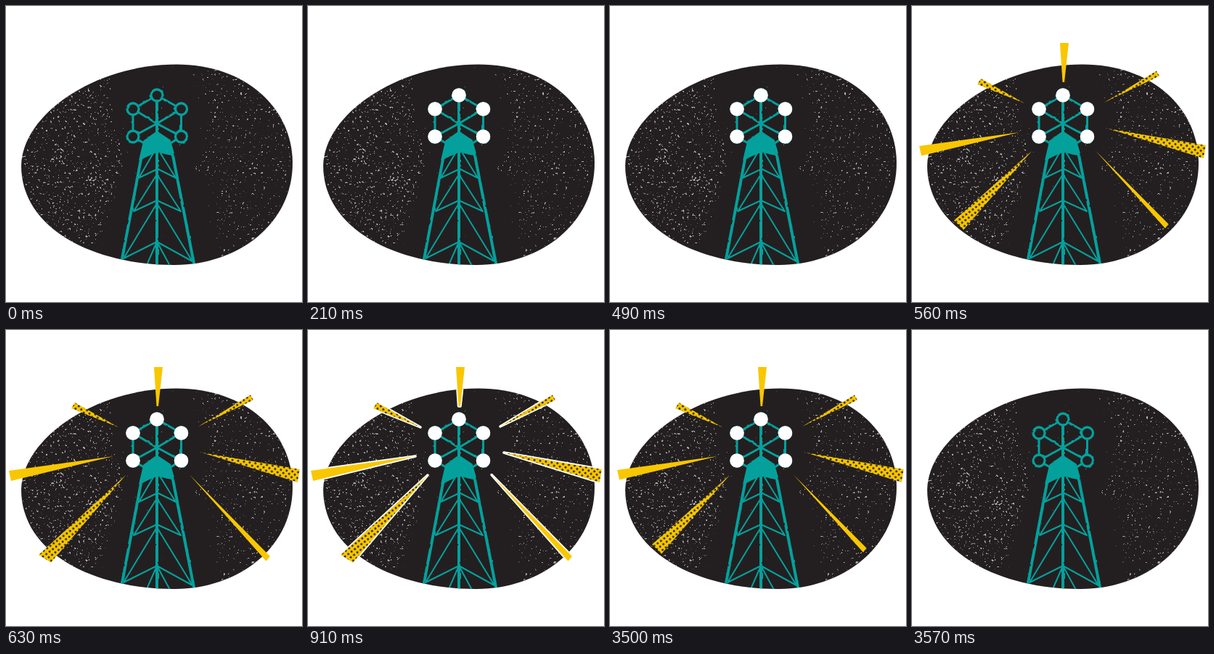
An HTML page without scripts that plays this animation: 408 by 408 pixels, repeating every 3.99 s.

```html
<!DOCTYPE html>
<html lang="en">
<head>
<meta charset="utf-8">
<title>Signal tower</title>
<style>
  html, body { margin: 0; width: 100%; height: 100%; overflow: hidden; background: #fff; }
  svg { display: block; width: 100vw; height: 100vh; }
  .dark { fill: #231f20; }
  .teal { fill: none; stroke: #04a19c; stroke-linecap: round; stroke-linejoin: round; }
  .plain { fill: #f8c700; }
  .dotted { fill: url(#dots); }
  .glow, .rays, .near, .far, .edge { visibility: hidden; animation: 3990ms step-end infinite; }
  .glow { animation-name: glow; }
  .rays { animation-name: rays; }
  .near { animation-name: near; }
  .far { animation-name: far; }
  .edge { animation-name: edge; }

  /* lamps flicker once, then stay lit */
  @keyframes glow {
    0%, 7.0175%, 89.4737% { visibility: hidden; }
    5.2632%, 8.7719% { visibility: visible; }
  }
  @keyframes rays {
    0%, 89.4737% { visibility: hidden; }
    14.0351% { visibility: visible; }
  }
  @keyframes near {
    0%, 15.7895%, 89.4737% { visibility: hidden; }
    14.0351%, 87.7193% { visibility: visible; }
  }
  @keyframes far {
    0%, 87.7193% { visibility: hidden; }
    15.7895% { visibility: visible; }
  }
  @keyframes edge {
    0%, 85.9649% { visibility: hidden; }
    22.807% { visibility: visible; }
  }
</style>
</head>
<body>
<svg viewBox="0 0 408 408" xmlns="http://www.w3.org/2000/svg">
  <defs>
    <path id="egg" d="M21 220C22 150 122 80.500 235 80.500C330 80.500 394 140 395 215C396 300 320 357 232 357C122 357 21 308 21 220Z"/>
    <clipPath id="inEgg"><use href="#egg"/></clipPath>

    <pattern id="dots" width="8" height="8" patternUnits="userSpaceOnUse" patternTransform="rotate(8)">
      <rect width="8" height="8" fill="#f8c700"/>
      <g class="dark"><circle cx="2" cy="2" r="1.5"/><circle cx="6" cy="6" r="1.5"/></g>
    </pattern>

    <filter id="rough" filterUnits="userSpaceOnUse" x="0" y="0" width="408" height="408" color-interpolation-filters="sRGB">
      <feTurbulence type="fractalNoise" baseFrequency=".14" seed="4"/>
      <feDisplacementMap in="SourceGraphic" scale="2.5" xChannelSelector="R" yChannelSelector="G"/>
    </filter>

    <!-- the drawn alpha sets how dense the grain is; slow noise gathers it into clumps -->
    <filter id="grain" filterUnits="userSpaceOnUse" x="0" y="0" width="408" height="408" color-interpolation-filters="sRGB">
      <feGaussianBlur in="SourceGraphic" stdDeviation="5" result="zone"/>
      <feTurbulence type="fractalNoise" baseFrequency=".06" numOctaves="2" seed="3" result="clumps"/>
      <feComposite in="zone" in2="clumps" operator="arithmetic" k1="1.4" k2=".3" result="density"/>
      <feTurbulence type="fractalNoise" baseFrequency=".31" numOctaves="3" seed="11"/>
      <feComposite in2="density" operator="arithmetic" k2="1" k3=".3" k4="-.835"/>
      <feComponentTransfer result="specks"><feFuncA type="linear" slope="11"/></feComponentTransfer>
      <feFlood flood-color="#b4b2b2"/>
      <feComposite in2="specks" operator="in"/>
    </filter>

    <g id="lamps">
      <circle cx="208" cy="123" r="8"/>
      <circle cx="175" cy="142" r="8"/>
      <circle cx="241.500" cy="142" r="8"/>
      <circle cx="175" cy="180" r="8"/>
      <circle cx="241.500" cy="180" r="8"/>
    </g>

    <g id="fixed">
      <path class="plain" d="M204 51L216 51L210 105L207.500 105Z"/>
      <path class="dotted" d="M95 100L90 108L155 134Z"/>
      <path class="dotted" d="M337 89.500L341 96.500L265 133Z"/>
      <path class="dotted" d="M405 192L402 210L270 169Z"/>
    </g>
    <g id="long">
      <path class="plain" d="M4 194L7 208L148 174Z"/>
      <path class="dotted" d="M45 310L62 320.500L165 200Z"/>
      <path class="plain" d="M364 312L358.500 318.500L253 199.500Z"/>
    </g>
    <g id="short">
      <path class="plain" d="M10 193L13 206.500L148 174Z"/>
      <path class="dotted" d="M58 295.500L71 308.500L165 200Z"/>
      <path class="plain" d="M353.500 300.500L349 306.500L253 199.500Z"/>
    </g>
  </defs>

  <use href="#egg" class="dark"/>

  <g clip-path="url(#inEgg)">
    <g filter="url(#grain)">
      <path fill-opacity=".52" d="M15 70H150L142 130L155 170L168 220L150 270L124 335H15Z"/>
      <path fill-opacity=".44" d="M245 80L278 135L272 185L248 218L285 250L290 360H400V80Z"/>
      <ellipse cx="85" cy="212" rx="22" ry="12" fill-opacity=".45"/>
      <ellipse cx="124" cy="244" rx="16" ry="14" fill-opacity=".4"/>
      <ellipse cx="55" cy="285" rx="12" ry="10" fill-opacity=".3"/>
      <ellipse cx="315" cy="184" rx="12" ry="9" fill-opacity=".3"/>
    </g>

    <g class="teal" filter="url(#rough)">
      <path stroke-width="3" d="M208 123L175 142V180L190 189M208 123L241.500 142V180L227 189M175 142L208 162L241.500 142M175 180L208 162L241.500 180"/>
      <path stroke-width="4" d="M208 123V360M187 206L159 354M230 206L260 360"/>
      <path fill="#04a19c" stroke-width="1.500" d="M208 173L226 185L232 206L222 204L208 201L196 206L184 212L190 186Z"/>
    </g>
    <path class="teal" stroke-width="2" d="M203 203L183 237L208 225M213 203L234 237L208 224M208 232L176 283L208 268M208 232L241 283L208 268M208 272L162 348L208 325M208 272L257 352L208 325M194 357L208 325L226 358"/>
  </g>

  <use href="#lamps" class="dark" stroke="#04a19c" stroke-width="3.300" filter="url(#rough)"/>
  <use href="#lamps" class="glow" fill="#fff" stroke="#fff" stroke-width="3.600"/>

  <g class="edge" stroke="#fff" stroke-width="3.500" stroke-linejoin="round" clip-path="url(#inEgg)">
    <use href="#fixed"/><use href="#long"/>
  </g>
  <use href="#fixed" class="rays"/>
  <use href="#short" class="near"/>
  <use href="#long" class="far"/>
</svg>
</body>
</html>
```
